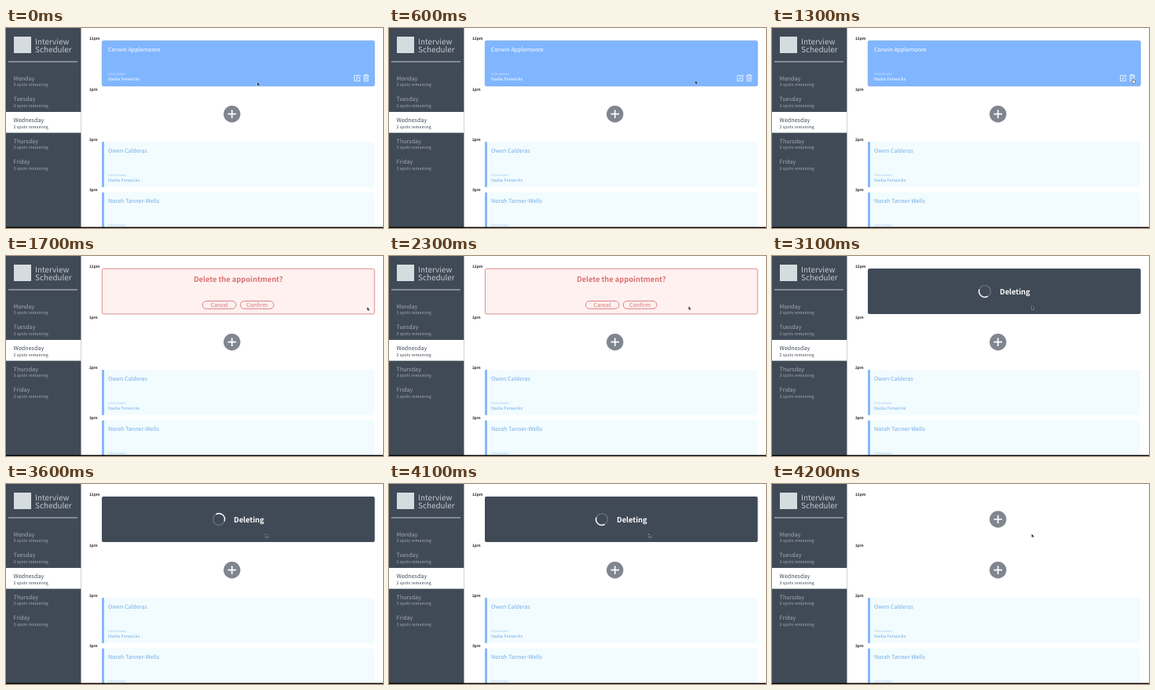
Animation, 480 px wide and 255 px high, one loop 4400 ms. Source, as an HTML page:

```html
<!DOCTYPE html>
<html lang="en">
<head>
<meta charset="utf-8">
<title>Interview Scheduler</title>
<style>
  html, body { margin: 0; width: 100%; height: 100%; overflow: hidden; background: #fff; }
  svg { display: block; width: 100%; height: 100%; }
  text {
    font: 7.16px "Noto Sans CJK JP", "Noto Sans CJK SC", "Noto Sans CJK", "Noto Sans", sans-serif;
    text-rendering: geometricPrecision;
  }
  .title { font-size: 9.9px; font-weight: 300; fill: #c3c8cd; }
  .day { fill: #a2a8af; }
  .spots { font-size: 5.37px; fill: #a2a8af; }
  .selected { fill: #404a57; }
  .hour { font-size: 4.8px; font-weight: 700; fill: #222; }
  .label { font-size: 4.35px; opacity: .65; }
  .person { font-size: 5.55px; }
  .heading { font-size: 9.3px; font-weight: 700; }
  .middle { text-anchor: middle; }
  .line { fill: none; stroke: #fff; stroke-width: .75; stroke-linejoin: round; stroke-linecap: round; }
</style>
</head>
<body>
<svg id="stage" viewBox="0 0 480 255" preserveAspectRatio="none"></svg>
<script>
const LOOP = 4400, STEP = 100;
const ROW = 64.4, DAY = 26.65;
const NAVY = '#404a57', BLUE = '#80b6ff', RED = '#d97272';

const text = (x, y, cls, content, attrs = '') =>
  `<text x="${x}" y="${y}" class="${cls}" ${attrs}>${content}</text>`;
const rect = (x, y, w, h, fill, attrs = '') =>
  `<rect x="${x}" y="${y}" width="${w}" height="${h}" fill="${fill}" ${attrs}/>`;
const group = (id, content) => `<g id="${id}">${content}</g>`;

const plus = y => `<g transform="translate(287.7 ${y})">
  <circle r="10.7" fill="#7f868f"/>
  <path d="M-5.3 0H5.3M0-5.3V5.3" stroke="#fff" stroke-width="1.7"/></g>`;

const details = (y, name, color) => `<g fill="${color}">
  ${text(130, y + 13.6, '', name)}
  ${text(130, y + 44, 'label', 'Interviewer')}
  ${text(130, y + 51, 'person', 'Nadia Fenwicks')}</g>`;

const booking = (y, name) =>
  rect(122, y, 347, 58, '#f2fcff', 'rx="1.5"') +
  rect(122, y, 3, 58, '#86b8f8', 'rx="1"') +
  details(y, name, '#74abe3');

const button = (id, x, label) =>
  rect(x, 57.4, 42.6, 9.9, 'none', `id="${id}" rx="4.95" stroke="${RED}" stroke-width=".9"`) +
  text(x + 21.3, 64.9, 'middle', label, `id="${id}Text" fill="${RED}"`);

const days = ['Monday', 'Tuesday', 'Wednesday', 'Thursday', 'Friday'].map((day, i) => {
  const y = 66.6 + i * DAY, tone = i === 2 ? ' selected' : '';
  return text(9.6, y, 'day' + tone, day) +
    text(9.6, y + 7.6, 'spots' + tone, '3 spots remaining', i === 2 ? 'id="spots"' : '');
}).join('');

const hours = ['12pm', '1pm', '2pm', '3pm']
  .map((hour, i) => text(106, 15.2 + i * ROW, 'hour', hour)).join('');

const sidebar = rect(0, 0, 95.5, 255, NAVY) +
  rect(10, 11, 22, 21, '#d5dce0') +
  text(37, 20.7, 'title', 'Interview') + text(37, 30.6, 'title', 'Scheduler') +
  rect(3, 42.5, 88, 1, '#c5cbd1') +
  rect(0, 107, 95.5, 26.6, '#fff') + days;

const shown = group('shown',
  rect(122.3, 16.2, 346.9, 57.8, BLUE, 'rx="2" stroke="#74a5e4" stroke-width=".7"') +
  details(16.2, 'Corwin Applemoore', '#fff') +
  `<path class="line" d="M448 60.5H443.5V67.5H450.5V64M446 65.2L446.4 63.3 450 59.6 451.5 61.1 447.9 64.8Z"/>
   <path class="line" d="M455 60.7H462M457 60.5V59.4H460V60.5M455.9 60.9V67.7H461.1V60.9M457.5 62.5V66M459.5 62.5V66"/>`);

const asking = group('asking',
  rect(122.4, 16.3, 346.8, 57.6, '#fff1f0', `rx="2" stroke="${RED}" stroke-width=".8"`) +
  text(295.7, 32.7, 'heading middle', 'Delete the appointment?', `fill="${RED}"`) +
  button('cancel', 250.3, 'Cancel') + button('confirm', 298.3, 'Confirm'));

const deleting = group('deleting',
  rect(122, 16, 347.5, 58, NAVY, 'rx="2"') +
  text(290, 48.6, 'heading', 'Deleting', 'fill="#fff"') +
  `<g fill="none" stroke-width="1.4">
     <circle cx="271" cy="45" r="7.4" stroke="#66707b"/>
     <path id="spinner" d="M274.7 51.4A7.4 7.4 0 0 1 264 42.5" stroke="#fff"/></g>`);

const pointer = group('cursor',
  `<path id="arrow" d="M0 0V4.6L1.2 3.7 1.9 5.3 2.7 4.9 2 3.4H3.4Z" fill="#111" stroke="#fff" stroke-width=".35"/>
   <path id="hand" d="M-.6 .2Q0-.6 .6 .2V2L2.8 2.5V4.2L2.1 5.6H-.4L-1.8 3.3-1.2 2.8-.6 3.2Z" fill="#fff" stroke="#222" stroke-width=".5"/>`);

document.getElementById('stage').innerHTML =
  rect(0, 0, 480, 255, '#fff') + sidebar + hours +
  plus(109.7) + booking(145, 'Owen Calderas') + booking(209.4, 'Norah Tanner-Wells') +
  shown + asking + deleting + group('empty', plus(45)) +
  rect(0, 253.7, 480, 1.3, '#000') + pointer;

const $ = id => document.getElementById(id);
const show = (id, visible) => $(id).setAttribute('display', visible ? 'inline' : 'none');
const ease = (t, from, to) => {
  const p = Math.min(1, Math.max(0, (t - from) / (to - from)));
  return p * p * (3 - 2 * p);
};

function draw(t) {
  const toTrash = ease(t, 0, 1200), toConfirm = ease(t, 1900, 2600);
  const x = 320 + 139.8 * toTrash - 129.3 * toConfirm;
  const y = 69 - 4 * toTrash - 1.5 * toConfirm;
  const overConfirm = t >= 2000 && t < 3100 && x < 341;
  const hand = overConfirm || (t >= 1300 && t < 1700);

  show('shown', t < 1700);
  show('asking', t >= 1700 && t < 3100);
  show('deleting', t >= 3100 && t < 4200);
  show('empty', t >= 4200);
  show('arrow', !hand);
  show('hand', hand);

  $('cursor').setAttribute('transform', `translate(${x} ${y})`);
  $('confirm').setAttribute('fill', overConfirm ? '#ed716b' : 'none');
  $('confirmText').setAttribute('fill', overConfirm ? '#fff' : RED);
  $('spinner').setAttribute('transform', `rotate(${(t - 3100) * .36} 271 45)`);
  $('spots').textContent = `${t < 4200 ? 2 : 3} spots remaining`;
}

const start = performance.now();
function tick() {
  const t = (performance.now() - start) % LOOP;
  draw(Math.floor(t / STEP) * STEP);
  requestAnimationFrame(tick);
}
tick();
</script>
</body>
</html>
```
